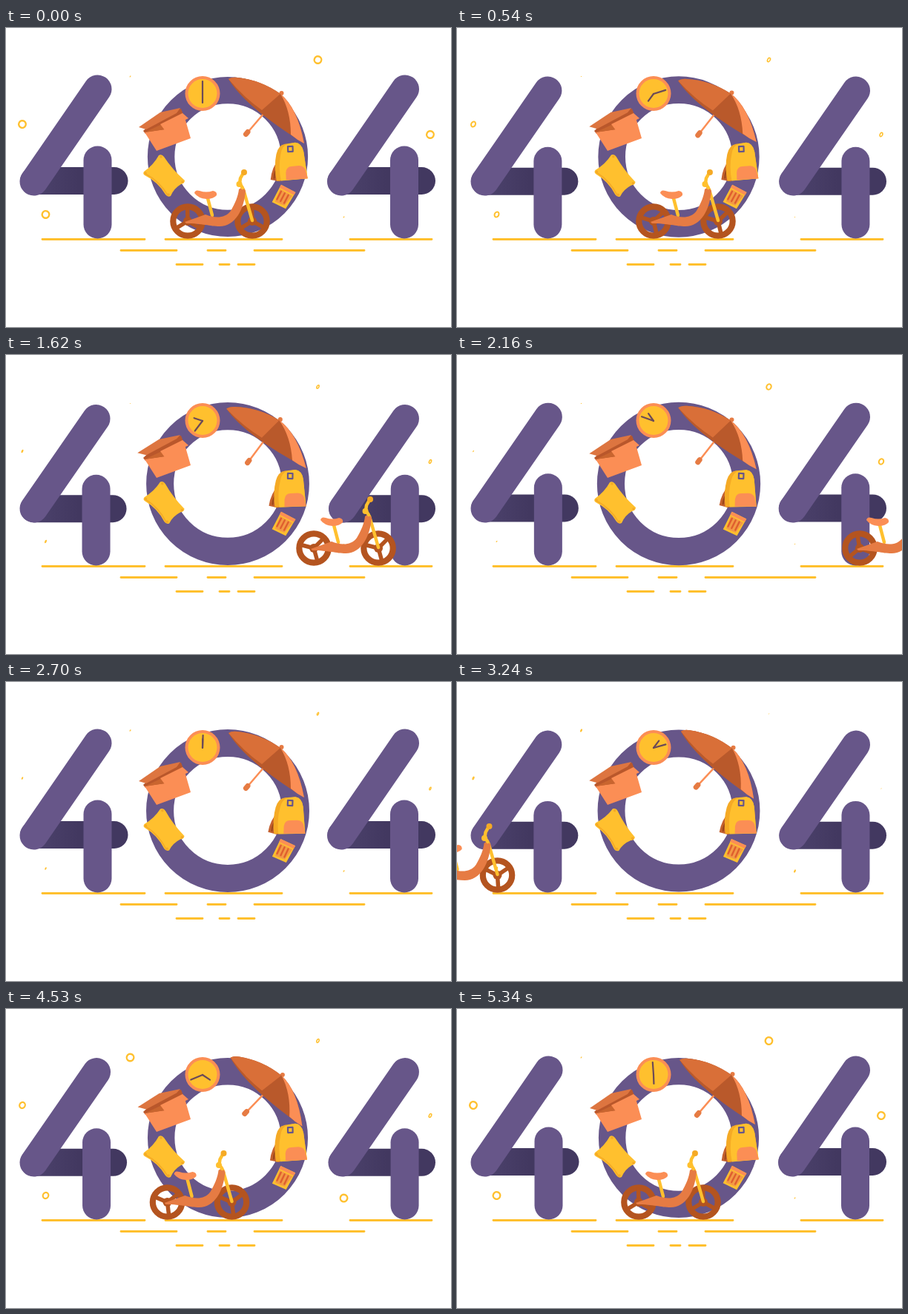
An HTML page with a canvas for the animation above (5370 ms loop, 600 by 404 pixels).

```html
<!DOCTYPE html>
<html lang="en">
<head>
<meta charset="utf-8">
<title>404</title>
<style>
  html, body { margin: 0; width: 100%; height: 100%; overflow: hidden; background: #fff; }
  canvas { display: block; width: 600px; height: 404px; }
</style>
</head>
<body>
<canvas id="stage"></canvas>
<script>
const LOOP = 5370, STEP = 30;
const C = {
  purple: '#675689', dark: '#423860', yellow: '#ffc02e', gold: '#f5aa25', orange: '#fb8e55',
  mid: '#e67b43', deep: '#c4602f', rust: '#b4541f'
};
const canvas = document.getElementById('stage');
const g = canvas.getContext('2d');
const dpr = window.devicePixelRatio || 1;
canvas.width = 600 * dpr;
canvas.height = 404 * dpr;
g.lineCap = g.lineJoin = 'round';

const wave = p => (1 - Math.cos(2 * Math.PI * p)) / 2;
const mix = (a, b, k) => a + (b - a) * k;

function fill(d, color) {
  g.fillStyle = color;
  g.fill(new Path2D(d));
}
function stroke(d, color, width) {
  g.strokeStyle = color;
  g.lineWidth = width;
  g.stroke(new Path2D(d));
}
function disc(x, y, r, color) {
  g.fillStyle = color;
  g.beginPath();
  g.arc(x, y, r, 0, 7);
  g.fill();
}
function ring(x, y, r, width, color) {
  g.strokeStyle = color;
  g.lineWidth = width;
  g.beginPath();
  g.arc(x, y, r, 0, 7);
  g.stroke();
}
// Draws around a pivot, turned by degrees
function turned(x, y, deg, draw) {
  g.save();
  g.translate(x, y);
  g.rotate(deg * Math.PI / 180);
  g.translate(-x, -y);
  draw();
  g.restore();
}

function four(x1, x2, y1, barEnd, stem, stemTop, barY) {
  const shade = g.createLinearGradient(x1, 0, x1 + 60, 0);
  shade.addColorStop(0, '#4c426c');
  shade.addColorStop(1, C.dark);
  stroke(`M${x1} ${barY}H${barEnd}`, shade, 37);
  stroke(`M${x1} 207.5L${x2} ${y1}`, C.purple, 38);
  stroke(`M${stem} ${stemTop}V265.5`, C.purple, 38);
}

function fours(t) {
  const p = t % (LOOP / 2);
  const low = wave(p < 1150 ? p / 2300 : 0.5 + (p - 1150) / 3070);
  const topY = mix(82.5, 87, low), stemTop = mix(178.5, 181.5, low), barY = mix(206.5, 208, low);
  four(37.5, mix(123.5, 121, low), topY, mix(146, 143.5, low), mix(123.5, 121, low), stemTop, barY);
  four(mix(452, 454.5, low), 538, topY, 560.5, mix(537, 538, low), stemTop, barY);
}

function zero(t) {
  const k = (108.8 + 1.1 * Math.cos(2 * Math.PI * (t - 2200) / LOOP)) / 108;
  ring(299, 174, 90 * k, 36.5 * k, C.purple);
}

function clock(t) {
  const hand = (turn, len) => {
    const a = 2 * Math.PI * turn;
    stroke(`M265 89L${265 + len * Math.sin(a)} ${89 - len * Math.cos(a)}`, '#6b4a58', 2.2);
  };
  disc(265, 88.5, 23.5, C.orange);
  disc(265, 88.5, 19.5, C.yellow);
  hand(2 * t / LOOP, 17);
  hand(0.5 + t / LOOP, 12);
}

function umbrella(t) {
  turned(357, 113, -4 * Math.sin(2 * Math.PI * t / LOOP), () => {
    stroke('M371 88L325 142', C.orange, 2.5);
    stroke('M326 140.5L323.5 143.5', C.mid, 7);
    disc(371.5, 88, 3, C.mid);
    fill('M300 69Q304 66 312 67Q343 70 370 89Q393 108 402 156Q322 106 300 69Z', '#b9592b');
    fill('M300 69Q304 66 312 67Q343 70 370 89L345 111Q322 95 300 69Z', '#d96f38');
    fill('M370 89Q393 108 402 156Q392 151 384 144Q384 112 370 89Z', C.orange);
  });
}

function box(t) {
  const lift = 2 * wave(2 * t / LOOP);
  fill('M185 139L213 113L236 109L241 122L215 139L188 143Z', '#b9572b');
  fill('M187 141L214 137L241 121L249 149L203 166Z', C.orange);
  fill('M187 141L214 137L211 131L235 118Z', '#c9652f');
  fill(`M${179 - lift} ${134 - lift}L${208 - lift} 114L235 108L230 ${115 - lift}L189 ${137 - lift}Z`, '#dd7540');
  fill('M214 138L208 130L238 115L246 122Z', C.orange);
}

function pillow(t) {
  const p = t / LOOP;
  turned(213.5, 200, p < 0.8 ? 8 * wave(p / 0.4) : 0, () => {
    fill('M186 194Q199 185 206 172Q210 170 213 174Q224 191 241 206Q241 210 236 211Q226 217 222 227Q218 229 215 225Q205 208 187 199Q184 197 186 194Z', C.yellow);
    stroke('M188 197Q207 207 218 226', C.gold, 1.6);
    for (const [x, y] of [[188, 196], [209, 174], [238, 208], [219, 225]]) disc(x, y, 1.8, C.gold);
  });
}

function backpack(t) {
  turned(384, 160, -2.2 * Math.cos(2 * Math.PI * t / LOOP), () => {
    fill('M368 175Q357 188 355 204L368 207Z', C.deep);
    stroke('M367 186Q360 193 360 202', '#994718', 2);
    fill('M364 170Q367 158 376 156.5L390 155Q399 156 401 168L405 204L363 206Q360 186 364 170Z', C.gold);
    fill('M370 170Q372 158 381 156.5L390 155Q399 156 401 168L405 204L369 206Q366 186 370 170Z', C.yellow);
    fill('M376 195Q377 187 384 187L394 186.5Q402 187 403 195L405 204L376 205Z', C.orange);
    stroke('M380 160h6.5v7h-6.5z', C.purple, 2.2);
  });
}

function cup(t) {
  turned(374, 229, 4 * wave(t / LOOP + 0.35), () => {
    fill('M370 212L390 221L378 244L359 236Z', C.yellow);
    fill('M370 212L390 221L388 225L368 216Z', C.orange);
    fill('M369 218L386 226L376 240L363 235Z', '#f39a45');
    for (let i = 0; i < 3; i++) {
      const x = 370.5 + 5 * i, y = 221 + 2.2 * i;
      stroke(`M${x} ${y}l-5 11`, '#df5f2e', 2.4);
    }
  });
}

function bikeX(t) {
  const s = t / 1000;
  if (t < 2690) return 245 + 73 * Math.pow(s / 1.05, 1.95);
  const u = LOOP / 1000 - s;
  return 245 - 36.3 * u * u - 4.05 * Math.pow(u, 4.4);
}

function wheel(x, spin) {
  ring(x, 0, 19.7, 8.2, C.rust);
  for (let i = 0; i < 3; i++) {
    const a = spin + i * 2 * Math.PI / 3;
    stroke(`M${x} 0L${x + 17 * Math.cos(a)} ${17 * Math.sin(a)}`, C.rust, 5.5);
  }
  disc(x, 0, 6, C.rust);
}

function bike(t) {
  const x = bikeX(t), spin = (x - 245) / 24 + 0.5;
  g.save();
  g.translate(x, 261);
  wheel(0, spin);
  wheel(87, spin);
  stroke('M27 -31L33 -8', C.yellow, 4.5);
  fill('M9 -38Q10 -43 16 -41Q25 -38 34 -41Q40 -40 39 -35Q35 -30 25 -30Q14 -31 9 -38Z', C.orange);
  stroke('M75 -43L87 -1', C.yellow, 4.5);
  fill('M-4 1L24 -9C36 -4 50 -3 58 -14C64 -24 68 -34 69 -43Q74 -48 78 -41C76 -16 64 7 43 7C30 7 20 3 -2 3Z', C.mid);
  stroke('M74 -45L70 -51L71 -58L75 -65', C.yellow, 4.5);
  disc(69.5, -50, 4, C.yellow);
  disc(76, -66, 4, C.gold);
  g.restore();
}

const lines = [
  [285.5, [48, 188], [214, 373], [463, 575]],
  [300.5, [154, 231], [271, 297], [334, 484]],
  [319.5, [229, 266], [287, 302], [312, 336]]
];
function ground() {
  for (const [y, ...spans] of lines)
    for (const [a, b] of spans) stroke(`M${a + 1} ${y}H${b - 1}`, C.yellow, 2.8);
}

// Coin sizes over the loop
const times = [0, 1050, 2160, 3240, 3900, 4530, LOOP];
const coins = [
  [[[22, 130], [53.5, 252]], [1, 0.55, 0.2, 0.4, 0.2, 0.88, 1]],
  [[[420.5, 43], [572, 144]], [1, 0.22, 0.8, 0.05, 0.2, 0.55, 1]],
  [[[167.5, 65.5], [455.5, 255.5]], [0.2, 0, 0.12, 0.35, 0.66, 1, 0.2]]
];
function sparkle(t) {
  let i = 0;
  while (t >= times[i + 1]) i++;
  const k = wave((t - times[i]) / (times[i + 1] - times[i]) / 2);
  for (const [spots, sizes] of coins) {
    const s = mix(sizes[i], sizes[i + 1], k);
    if (s < 0.04) continue;
    for (const [x, y] of spots) {
      g.strokeStyle = C.yellow;
      g.lineWidth = 0.5 + 1.9 * s;
      g.beginPath();
      g.ellipse(x, y, 4.8 * s * s, 4.8 * s, 0.45, 0, 7);
      g.stroke();
    }
  }
}

function draw(t) {
  g.setTransform(dpr, 0, 0, dpr, 0, 0);
  g.fillStyle = '#fff';
  g.fillRect(0, 0, 600, 404);
  ground();
  sparkle(t);
  fours(t);
  zero(t);
  umbrella(t);
  clock(t);
  box(t);
  pillow(t);
  backpack(t);
  cup(t);
  bike(t);
}

const start = performance.now();
function tick() {
  const t = (performance.now() - start) % LOOP;
  draw(Math.floor(t / STEP) * STEP);
  requestAnimationFrame(tick);
}
tick();
</script>
</body>
</html>
```
